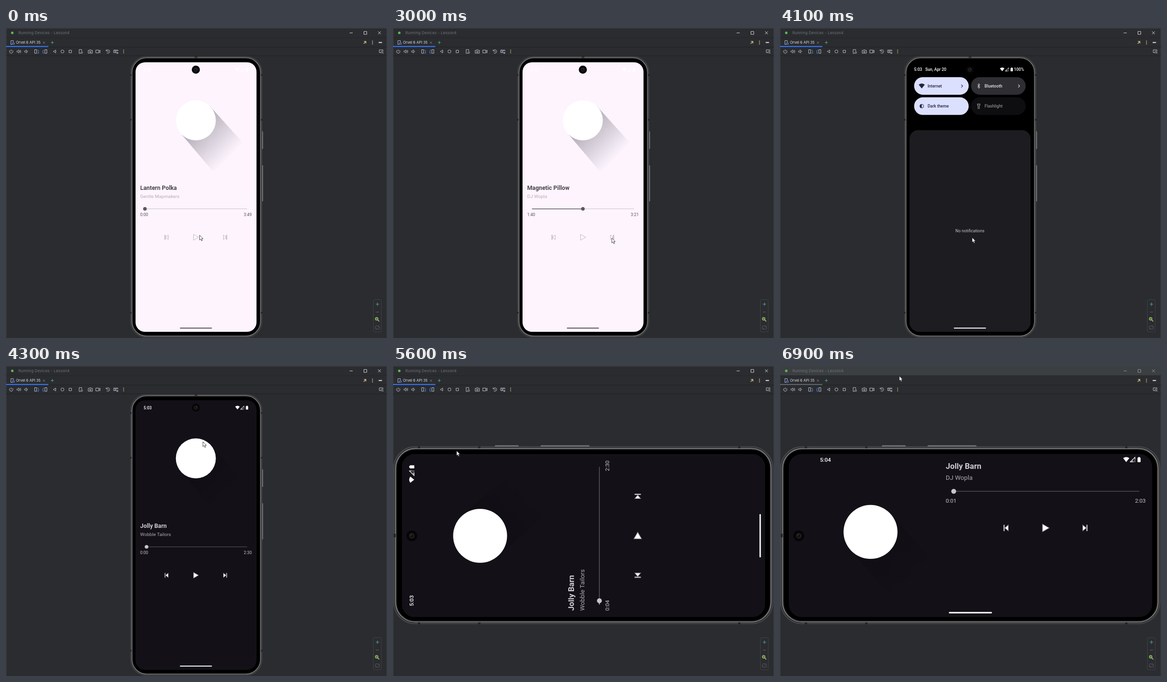
Recreate the animation shown at these times as an HTML page. Size 800 by 651 pixels, loop 7000 ms.

```html
<!DOCTYPE html>
<html lang="en">
<head>
<meta charset="utf-8">
<title>Music player</title>
<style>
html, body { margin: 0; width: 100%; height: 100%; overflow: hidden; background: #2a2c30; }
svg { display: block; width: 800px; height: 651px; }
.ui { font-family: Inter, sans-serif; }
.app { font-family: Roboto, sans-serif; }
</style>
</head>
<body>
<svg id="stage" viewBox="0 0 800 651"></svg>
<script>
const LOOP = 7000, STEP = 100, K = 1.348;
const stage = document.getElementById('stage');

// time, tip x, tip y
const moves = [
  [0, 406, 435], [200, 406, 435], [600, 388, 379], [800, 388, 379], [1100, 310, 380],
  [1400, 311, 380], [1700, 459, 441], [1850, 459, 441], [2050, 442, 490], [2400, 398, 379],
  [2600, 398, 379], [2900, 459, 441], [3200, 459, 441], [3500, 332, 80], [3700, 323, 333],
  [3900, 338, 163], [4000, 340, 166], [4100, 403, 440], [4300, 413, 159], [4600, 399, 438],
  [4800, 399, 438], [5200, 64, 47], [5400, 64, 47], [5600, 133, 178], [6000, 556, 340],
  [6300, 640, 340], [6500, 640, 340], [6900, 250, 21]
];

const songs = [
  ['Lantern Polka', 'Gentle Mapmakers', 229],
  ['Magnetic Pillow', 'DJ Wopla', 201],
  ['Jolly Barn', 'Wobble Tailors', 150],
  ['Jolly Barn', 'DJ Wopla', 123]
];

// from, song, start second, seconds per second, label lag
const plays = [
  [0, 0, 0, 0, 0], [100, 0, 0, 4, 0], [600, 0, 101, 4, 0], [1200, 0, 20, 4, 0],
  [1800, 1, 0, 4, 0], [2400, 1, 98, 4, 0], [3100, 2, 0, 2, 0], [4000, 2, 2.4, 0, 2.4],
  [4600, 2, 0, 4, 0], [6500, 3, 0, 2.6, 0]
];

const light = { bg: '#fdf4fe', title: '#4a434e', sub: '#b4aeb7', time: '#55505a', knob: '#5c5661',
  done: '#4f4a54', track: '#c6c0c9', edge: '#aaa5ad', nav: '#5b525c', fill: '#fdf8fe' };
const dark = { bg: '#131117', title: '#cfcbd3', sub: '#aeaab2', time: '#c9c5cc', knob: '#c9c4d2',
  done: '#c9c4d2', track: '#5c5961', edge: '#77747a', nav: '#ffffff', fill: '#ffffff' };

const rect = (x, y, w, h, r, fill, more = '') =>
  `<rect x="${x}" y="${y}" width="${w}" height="${h}" rx="${r}" fill="${fill}" ${more}/>`;
const disc = (x, y, r, fill, more = '') => `<circle cx="${x}" cy="${y}" r="${r}" fill="${fill}" ${more}/>`;
const path = (d, fill, more = '') => `<path d="${d}" fill="${fill}" ${more}/>`;
const line = (d, color, w = 1) => path(d, 'none', `stroke="${color}" stroke-width="${w}"`);
const group = (tf, body, more = '') => `<g transform="${tf}" ${more}>${body}</g>`;
const at = (x, y, body) => group(`translate(${x} ${y})`, body);
const text = (x, y, size, str, fill, more = '') =>
  `<text x="${x}" y="${y + size * .355}" font-size="${size}" fill="${fill}" ${more}>${str}</text>`;
const clock = s => Math.floor(s / 60) + ':' + String(Math.floor(s % 60)).padStart(2, '0');
const ramp = (t, a, b) => {
  const p = Math.min(1, Math.max(0, (t - a) / (b - a)));
  return p * p * (3 - 2 * p);
};

function cursor(t) {
  let i = 0;
  while (i < moves.length - 2 && moves[i + 1][0] <= t) i++;
  const [a, x, y] = moves[i], [b, u, v] = moves[i + 1], p = ramp(t, a, b);
  return at(x + (u - x) * p, y + (v - y) * p,
    path('M.5 0V10.2L2.8 8.2L4.6 12L6.3 11.2L4.6 7.6H7.8Z', '#fff', 'stroke="#222" stroke-width=".8"'));
}

function playback(t) {
  const [from, id, start, rate, lag] = plays.filter(p => p[0] <= t).pop();
  const sec = start + (t - from) / 1000 * rate;
  const [title, artist, total] = songs[id];
  return { title, artist, total, sec, label: clock(Math.max(0, sec - lag)) };
}

function statusIcons(x, y, c, gap = 10) {
  return at(x, y, path('M-4.8-2.2Q0-5.8 4.8-2.2L0 3.8Z', c)) +
    at(x + gap, y, path('M-3.4 3.6H1.2V-1.2Z', c, 'opacity=".35"') +
      line('M3.6 .2V-3.6L-3.6 3.6H1.6M3.4 1V2.4M3.4 3V4', c, .9)) +
    at(x + gap * 2, y, rect(-2.4, -3, 4.8, 7, .8, c) + rect(-1.2, -4, 2.4, 1.5, 0, c));
}

function cover(x, y, isDark) {
  return at(x, y, path('M-29.7 29.7L29.7-29.7L98 46L40 112Z', isDark ? 'url(#shadeDark)' : 'url(#shade)') +
    disc(0, 0, 42, '#fff'));
}

function controls(x, y, c) {
  const ink = `stroke="${c.edge}" stroke-width=".8"`;
  const skip = path('M-3.7-4.7H-2.300V4.700H-3.700ZM3.700-4.700V4.700L-2 0Z', c.fill, ink);
  return at(x - 61.6, y, skip) + at(x, y, path('M-4.800-6.100V6.100L5.700 0Z', c.fill, ink)) +
    group(`translate(${x + 61.6} ${y}) scale(-1 1)`, skip);
}

// ys: title, artist, slider, times, buttons
function player(p, c, x0, x1, ys, cx) {
  const a = x0 + 9.9, b = x1 - 9.9, k = a + (b - a) * p.sec / p.total;
  return text(x0, ys[0], 12.33, p.title, c.title, 'font-weight="700"') +
    text(x0, ys[1], 9.86, p.artist, c.sub) +
    line(`M${a} ${ys[2]}H${b}`, c.track, 1.1) + line(`M${a} ${ys[2]}H${k}`, c.done, 1.2) +
    disc(k, ys[2], 3.8, c.knob) +
    text(x0, ys[3], 8.63, p.label, c.time) +
    text(x1, ys[3], 8.63, clock(p.total), c.time, 'text-anchor="end"') +
    controls(cx, ys[4], c);
}

function tile(x, y, label, on, icon, arrow, faint) {
  const ink = on ? '#23263c' : faint ? '#8b8b90' : '#e2e2e7';
  return rect(x, y, 114.6, 37, 18.5, on ? '#dce0ff' : faint ? '#0e0e11' : '#2e2e33') +
    at(x + 16, y + 18.5, icon(ink)) +
    text(x + 28.3, y + 18.8, 8.63, label, ink, 'font-weight="500"') +
    (arrow ? line(`M${x + 99} ${y + 15.6}l3 3l-3 3`, ink, 1.1) : '');
}

const wifi = c => path('M-6.4-2.6Q0-8 6.4-2.6L0 5.2Z', c);
const rune = c => line('M-2.6-2.6L2.6 2.4L0 5V-5L2.6-2.4L-2.6 2.6', c, 1);
const half = c => disc(0, 0, 4, 'none', `stroke="${c}"`) + path('M0-4A4 4 0 0 0 0 4Z', c);
const torch = c => line('M-2.7-4.8H2.7V-2.4L1.5-.6V4.8H-1.5V-.6L-2.7-2.4ZM-2.7-2.6H2.7M0 .6V2', c, 1.1);

function shade(p, isDark) {
  const top = rect(272, 72, 254, 566, 0, '#000', `opacity="${Math.min(1, p * 1.4)}"`);
  const head = text(281.5, 87, 8.63, '5:03', '#fff', 'font-weight="500"') +
    text(305, 87, 8.63, 'Sun, Apr 20', '#fff', 'font-weight="500"') +
    statusIcons(466.5, 87, '#fff') + text(491.3, 87, 8.63, '100%', '#fff', 'font-weight="500"');
  const tiles = tile(281.6, 103.2, 'Internet', true, wifi, true) +
    tile(401.2, 103.2, 'Bluetooth', false, rune, true) +
    tile(281.6, 145.6, 'Dark theme', isDark, half) +
    tile(401.2, 145.6, 'Flashlight', false, torch, false, true);
  const panel = rect(272, 214.5, 254, 424 * p, 18, isDark ? '#1d1c21' : '#dcd9e1') +
    text(398.8, 426, 8.63, 'No notifications', isDark ? '#c8c5cb' : '#55515a', 'text-anchor="middle"');
  return top + `<g opacity="${p}">${head + group(`translate(0 ${(p - 1) * 30})`, tiles) + panel}</g>`;
}

function portrait(t) {
  const isDark = t >= 4000, c = isDark ? dark : light;
  const pull = ramp(t, 3500, 3700) * (1 - ramp(t, 4100, 4300));
  return rect(272, 72, 254, 566, 0, c.bg) +
    text(289, 87.5, 8.63, '5:03', '#fff', 'font-weight="500"') + statusIcons(486, 87.5, '#fff') +
    cover(398.6, 194, isDark) +
    player(playback(t), c, 281.8, 516, [336, 353, 379.8, 392, 439.5], 398.6) +
    (pull > 0 ? shade(pull, isDark) : '') +
    rect(365, 629.2, 67.5, 2.1, 1, pull > .5 && !isDark ? '#5b525c' : c.nav);
}

function landscape(t) {
  return group(`scale(${K})`,
    text(62.3, 145.8, 8.63, '5:04', '#fff', 'font-weight="500"') + statusIcons(539.3, 145.8, '#fff') +
    cover(141, 258.5, true) +
    player(playback(t), dark, 258.2, 569.6, [155.8, 173.6, 195.2, 209.6, 252.3], 413.6) +
    rect(263, 383.2, 67.2, 2.1, 1, '#fff'));
}

function body() {
  const notch = (x, y) => rect(x, y, 3, 3.5, 0, '#222325');
  const rim = (inset, r, fill, stroke, w = 1) =>
    rect(261 + inset, 59 + inset, 277 - 2 * inset, 591.5 - 2 * inset, r, fill, `stroke="${stroke}" stroke-width="${w}"`);
  return rect(536, 217, 3.7, 37, 1, '#77787a') + rect(536, 288.3, 3.7, 76, 1, '#77787a') +
    rim(.6, 33, '#333436', '#4c4d4f') + rim(3.4, 31, '#1c1c1d', '#858687', 1.3) +
    [97, 191, 596].map(y => notch(261, y) + notch(535, y)).join('') +
    rect(396, 59.5, 6, 3, 1, '#222') +
    rim(5.6, 28, '#000', '#0b0b0c');
}

function lens() {
  return disc(398.6, 87.6, 8.5, '#060607') + disc(398.6, 87.6, 4.6, '#18181a') +
    disc(398.6, 87.6, 2.6, '#0a0a0b', 'stroke="#303033" stroke-width=".7"') + disc(399.8, 86.6, .8, '#4a4a4e');
}

function device(t) {
  const turned = t >= 5300, wide = t >= 5800;
  const screen = wide ? rect(272, 72, 254, 566, 20, dark.bg)
    : `<g clip-path="url(#glass)">${portrait(t)}</g>`;
  const phone = body() + screen + lens();
  const out = turned ? group(`matrix(0 ${-K} ${K} 0 -78.6 893.9)`, phone) : phone;
  return `<g class="app">${out}${wide ? landscape(t) : ''}</g>`;
}

function tools() {
  const g = '#bfc2c8', blue = '#548af7';
  const speaker = 'M-4-1.2H-2.5L0-3.4V3.4L-2.5 1.2H-4Z';
  const dots = (x, y, c) => [-3, 0, 3].map(d => disc(x, y + d, .9, c)).join('');
  const icons = [
    [11, line('M-2.4-2.6A3.6 3.6 0 1 0 2.4-2.6M0-4V0', g)],
    [27, line(speaker + 'M1.6-1.8Q3 0 1.6 1.8M3-3.2Q5.6 0 3 3.2', g, .9)],
    [43, line(speaker + 'M1.6-1.8Q3 0 1.6 1.8', g, .9)],
    [64, line('M-3.8-3.8H.4V3.8H-3.8Z', g) + line('M2-3.4Q5-3 4.6 1M2 3.6H4.6V1', blue)],
    [82, line('M-.4-3.8H3.8V3.8H-.4Z', g) + line('M-2-3.4Q-5-3-4.6 1M-2 3.6H-4.6V1', blue)],
    [102, line('M2.4-3V3L-2.6 0Z', g)],
    [118.5, disc(0, 0, 3.2, 'none', `stroke="${g}"`)],
    [135, line('M-2.6-2.6H2.6V2.6H-2.6Z', g)],
    [157, line('M0 4H-3.4V-4H2V-1', g) + disc(2, 2.2, 1.8, 'none', `stroke="${g}"`)],
    [177, line('M-4.4-2.4H-2L-1-3.8H1L2-2.4H4.4V3.6H-4.4Z', g) + disc(0, .5, 1.6, 'none', `stroke="${g}"`)],
    [193, line('M-4.4-3H1.8V3H-4.4ZM1.8-.8L4.6-2.8V2.8L1.8.8', g)],
    [214, line('M-3.4-1.4A3.7 3.7 0 1 1-2.6 2.6M-3.8-3.8V-1.2H-1.2M0-1.8V.4L1.6 1.2', g)],
    [230.5, line('M1 2.4H-4.4V-3H4.4V-.4M-2.8-1.2H2.8M-2.4.8H.8', g) + line('M2 2.2H4.6V4H2Z', g)],
    [788, line('M-4.2-3.4H3.4V-1M-4.2-3.4V2.4H-1', g) + disc(1.4, 1.2, 2, 'none', `stroke="${g}"`) + line('M2.8 2.6L4.4 4.2', g)]
  ];
  const tab = line('M0 4H-2.8V-4H2.4V0', '#c5c8ce', .9) + line('M.4 1H4.400V3.800H.400Z', blue, 1.1);
  return icons.map(([x, b]) => at(x, 49.3, b)).join('') + dots(247, 49.3, '#e0ca82') +
    at(13, 30.5, tab) +
    text(21, 30.6, 7.6, 'Orvel 6 API 35', '#dfe1e5') +
    line('M77.5 28.5l4.4 4.4M81.9 28.5l-4.4 4.4', '#8b8f96', .8) +
    line('M94.3 30.5h6M97.3 27.5v6', '#4fae86', 1.1) +
    line('M751 33l4.5-4.5M751.5 28.2H755.7V32.5', '#e0ca82', 1.3) +
    dots(769.5, 30.5, '#e0ca82') + rect(782.5, 29.5, 7, 1.9, 0, '#e8eaee');
}

function zoomPanel() {
  return rect(771.5, 570.5, 16.5, 67.5, 2, '#2a2c30', 'stroke="#3f4146"') +
    line('M776.5 580h7M780 576.5v7', '#4ea58f', 1.2) + line('M776.5 596.5h6.5', '#5c5f65', 1.1) +
    disc(778.3, 610.8, 2.9, '#547a42', 'stroke="#a6c46f" stroke-width="1.1"') +
    line('M780.5 613l3.3 3.3', '#dccb7a', 1.4) +
    rect(775.5, 625.5, 8.5, 7, 1, 'none', 'stroke="#55585e"') +
    line('M777.5 629.5v1.5h1.5M780.5 627.3h1.5v1.5', '#55585e', .8);
}

function frame(active) {
  const btn = active ? '#d3d5d9' : '#8f9297';
  return rect(0, 0, 800, 651, 0, '#2a2c30') +
    rect(0, 0, 800, 20, 0, active ? '#2a2c30' : '#3c3f42') +
    line('M0 .5H800M.5 0V651M799.5 0V651', '#414347', .8) +
    line('M0 20.3H800', '#242528', .8) + line('M0 40H800M0 58.3H800', '#1f2023', .9) +
    disc(13.2, 10.2, 2.6, '#5fb85c') +
    text(26, 10, 8, 'Running Devices - Lesson4', '#6f737a', 'letter-spacing=".15"') +
    line('M721.5 10.3h6.5', btn) + line('M751.5 7.3h6v6h-6Z', btn) +
    line('M781.2 7.2l6 6M787.2 7.2l-6 6', btn) +
    rect(0, 37.8, 89, 2.2, 0, active ? '#3574f0' : '#62656b');
}

const stops = (id, color, a) => `<linearGradient id="${id}" gradientUnits="userSpaceOnUse" x1="0" y1="0" x2="74" y2="74">
  <stop offset="0" stop-color="${color}" stop-opacity="${a}"/><stop offset="1" stop-color="${color}" stop-opacity="0"/></linearGradient>`;
const defs = `<defs><clipPath id="glass">${rect(272, 72, 254, 566, 20, '#000')}</clipPath>
  ${stops('shade', '#77737f', .58)}${stops('shadeDark', '#060509', .3)}</defs>`;

function draw(t) {
  stage.innerHTML = defs + `<g class="ui">${frame(t < 6800) + tools() + zoomPanel()}</g>` + device(t) + cursor(t);
}

let last = -1;
function tick() {
  const t = Math.floor(performance.now() % LOOP / STEP) * STEP;
  if (t !== last) draw(last = t);
  requestAnimationFrame(tick);
}
tick();
</script>
</body>
</html>
```
